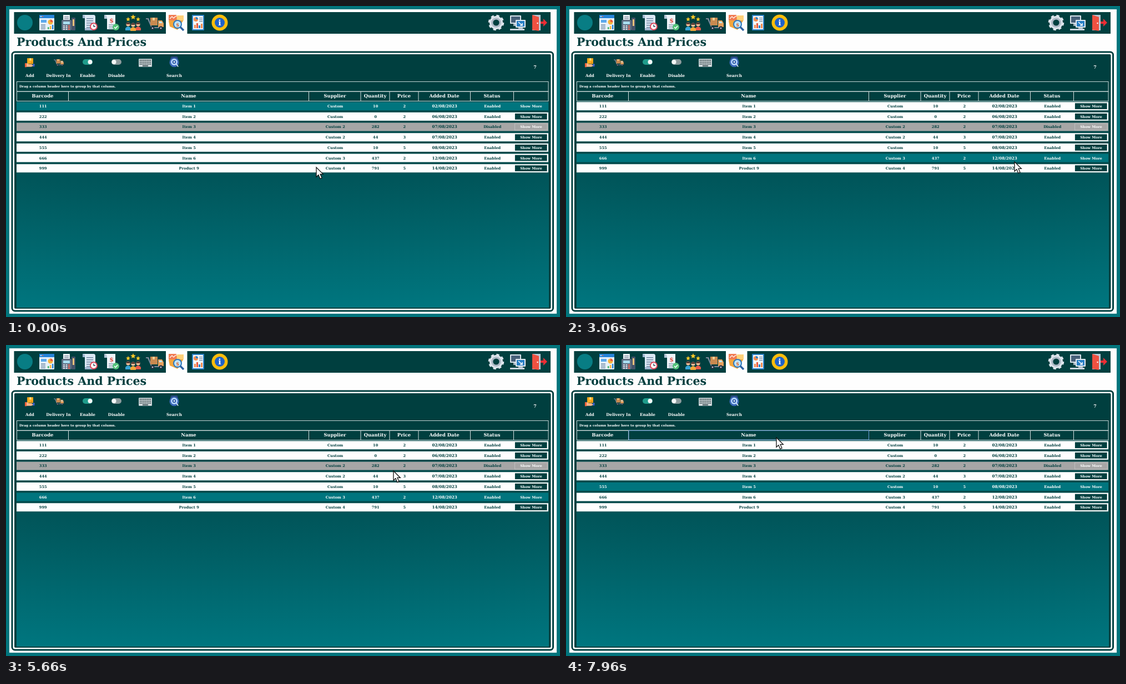
An HTML page that plays this animation: 998x561 px, repeating every 8000 ms.

```html
<!DOCTYPE html>
<html lang="en">
<head>
<meta charset="utf-8">
<title>Products And Prices</title>
<style>
html, body { margin: 0; width: 100%; height: 100%; overflow: hidden; background: #00757d }
svg { display: block; width: 100%; height: 100% }
text { font: bold 7px "DejaVu Serif", serif; text-rendering: geometricPrecision }
</style>
</head>
<body>
<svg id="stage" viewBox="0 0 998 561"></svg>
<script>
const DARK = '#003f3f', TEAL = '#00757e', WHITE = '#fefefe', GREY = '#a6a6a6';

// Drawing helpers, each returns SVG markup
const R = (x, y, w, h, fill, more = '') =>
  `<rect x="${x}" y="${y}" width="${w}" height="${h}" fill="${fill}" ${more}/>`;
const C = (x, y, r, fill, more = '') => `<circle cx="${x}" cy="${y}" r="${r}" fill="${fill}" ${more}/>`;
const P = (d, fill, more = '') => `<path d="${d}" fill="${fill}" ${more}/>`;
const L = (d, stroke, width = 1) => P(d, 'none', `stroke="${stroke}" stroke-width="${width}"`);
const T = (x, y, size, fill, text, anchor = 'middle', font = '') =>
  `<text x="${x}" y="${y}" fill="${fill}" text-anchor="${anchor}" style="font-size:${size}px;${font}">${text}</text>`;
const G = (x, y, scale, body) => `<g transform="translate(${x} ${y}) scale(${scale})">${body}</g>`;

// Icons, drawn around 0,0 in a box of about 28 px
const star = (x, y, r) => {
  let d = '';
  for (let i = 0; i < 10; i++) {
    const a = i * Math.PI / 5, q = i % 2 ? r * .45 : r;
    d += `${i ? 'L' : 'M'}${x + q * Math.sin(a)} ${y - q * Math.cos(a)}`;
  }
  return P(d + 'Z', '#ffc928');
};
const person = (x, y, shirt) =>
  P(`M${x - 5} ${y + 11}V${y + 7}Q${x} ${y + 1} ${x + 5} ${y + 7}V${y + 11}Z`, shirt) +
  C(x, y, 3.6, '#f5c09a') + P(`M${x - 3.6} ${y}A3.6 3.6 0 0 1 ${x + 3.6} ${y}Z`, '#5b3b33');
const lines = (x, y, w, n, gap, color) =>
  Array.from({ length: n }, (_, i) => R(x, y + i * gap, w, 1.4, color)).join('');

const icon = {
  logo: C(0, 0, 14, '#087d84'),
  dashboard: R(-13, -14, 27, 28, '#e6f1fb', 'rx="1"') + R(-13, -14, 27, 6, '#2684d8') +
    C(-10, -11, 1, '#fff') + C(-7, -11, 1, '#ff7058') + R(-10, -5, 10, 5, '#5ba9ec') +
    lines(-10, 3, 8, 4, 2.6, '#7d95ad') + C(7, -1, 4.5, '#f7b43c') + P('M7-1V-5.5A4.5 4.5 0 0 1 11.5-1Z', '#e9573f') +
    R(2, 8, 2.5, 4, '#4aba70') + R(6, 6, 2.5, 6, '#f7b43c') + R(10, 4, 2.5, 8, '#2684d8'),
  register: R(-9, -14, 12, 12, '#e8eef4') + lines(-7, -11, 8, 2, 3, '#8796a6') +
    R(-12, -5, 18, 19, '#5d6c80', 'rx="2"') + R(-9, -2, 12, 5, '#a9dcee') +
    [0, 1, 2, 3, 4, 5, 6, 7, 8].map(i => R(-9 + i % 3 * 4.5, 5 + (i / 3 | 0) * 3, 3, 2, i % 3 > 1 ? '#f06a5a' : '#dbe3ec')).join('') +
    R(6, -9, 7, 23, '#44536a', 'rx="1"') + R(8, -6, 3, 12, '#f1c27b'),
  history: P('M-13-14H7Q10-14 10-10V13H-9V-8H-13Z', '#dbe8f5') + P('M-13-14Q-8-14-9-8H-13Z', '#9fb6d0') +
    lines(-6, -8, 12, 5, 4, '#68829e') + P('M-9 10H6V14H-9Z', '#9fb6d0') +
    C(7, 7, 7, '#e2495b') + C(7, 7, 5, '#fff') + L('M7 3.5V7H10', '#3b4a63', 1.4),
  invoice: P('M-13-14H7V12H-8V-7H-13Z', '#edf3f8') + P('M-13-14Q-8-14-8-7H-13Z', '#b2c4d5') +
    T(0, 0, 11, '#e44f43', '$') + lines(-5, 3, 9, 3, 3, '#8ba0b5') +
    C(8, 8, 6, '#54c37a') + L('M5 8L7.3 10.3L11 6', '#fff', 1.7),
  people: star(0, -10, 5) + star(-9, -6, 4.2) + star(9, -6, 4.2) +
    person(-9, 3, '#38a7d8') + person(9, 3, '#e95c4b') + person(0, 4, '#f0a83a'),
  truck: P('M-16-8H-11L-5 8H12V10H-6L-13-6H-16Z', '#7c899b') + R(-8, -9, 13, 14, '#c98a50') +
    R(-4, -9, 4, 5, '#f0cd92') + P('M6-4H13L16 1V8H6Z', '#e8a05c') + P('M8-2H12L14 1H8Z', '#bfe5f0') +
    C(-4, 10, 3.4, '#27303f') + C(-4, 10, 1.3, '#cad3dd') + C(11, 10, 3.4, '#27303f') + C(11, 10, 1.3, '#cad3dd'),
  price: P('M-14-3L-3-12L13-5L2 13L-12 7Z', '#f4a63b') + P('M-14-14H0V-4H-14Z', '#f17b52') +
    L('M-12-7L-8-11L-5-8L-1-12', '#fff', 1.2) + R(1, -13, 12, 9, '#ffd17a') +
    C(2, 3, 8, '#2d78bd') + C(2, 3, 6, '#bfe6fa') + L('M7 8L13 14', '#2d62a2', 3.4) + T(2, 6.5, 9, '#e56b2f', '$'),
  report: R(-11, -14, 22, 28, '#2e83c8', 'rx="1"') + R(-9, -12, 18, 24, '#f3f7fb') +
    C(-4, -6, 4, '#f28b50') + P('M-4-6V-10A4 4 0 0 1 0-6Z', '#2e83c8') + lines(2, -9, 6, 3, 3, '#7890aa') +
    R(-7, 4, 3, 6, '#f28b50') + R(-3, 1, 3, 9, '#e9573f') + R(1, 5, 3, 5, '#2e83c8') + R(5, 2, 3, 8, '#f28b50'),
  info: C(0, 0, 14.5, '#fbbd0b') + C(0, 0, 9, '#1f62c9') + T(0, 5, 14, '#fff', 'i'),
  gear: C(0, 0, 12, '#dde4ec', 'stroke="#dde4ec" stroke-width="4.5" stroke-dasharray="5 4.42"') +
    C(0, 0, 9, '#aeb9c6') + C(0, 0, 5.6, DARK),
  computer: R(-14, -13, 20, 15, '#d9e2ea', 'rx="1"') + R(-12, -11, 16, 11, '#476079') + R(-8, 2, 8, 4, '#aebac7') +
    R(-4, -5, 18, 14, '#e3eaf0', 'rx="1"') + R(-2, -3, 14, 10, '#277fc5') + L('M1-1L8 5M8 1V5H4', '#fff', 1.5) +
    R(1, 9, 8, 4, '#aebac7') + R(-14, 11, 26, 3, '#cbd5de'),
  exit: R(-12, -14, 15, 28, '#b9c4d0') + P('M-12-14L0-10V15L-12 13Z', '#ef5141') + C(-2.5, 1, 1.2, '#fff') +
    P('M3-2H8V-7L15 0L8 7V2H3Z', '#ee2e35'),
  box: R(-8, -13, 18, 17, '#ffac1c') + R(-1, -13, 5, 7, '#ffe08a') + R(4, -2, 4, 3, '#d57a10') +
    P('M-14 3Q-8 0-3 5H5Q8 5 6 8L13 5Q16 5 13 9L4 13H-14Z', '#f7b58a') + R(-15, 2, 5, 12, '#f0643c') + R(9, 4, 5, 8, '#2e5ad2'),
  keyboard: R(-14, -8, 28, 17, '#d5dcdf', 'rx="1"') +
    Array.from({ length: 24 }, (_, i) => R(-12 + i % 8 * 3.1, -6 + (i / 8 | 0) * 4, 2, 2.4, '#33474b')).join('') +
    R(-6, 6, 12, 2, '#33474b'),
  search: R(-10, -15, 20, 24, '#27477c', 'rx="4"') + C(0, 1, 13, '#3a68b8') + C(0, 0, 9, '#b9d9ff') +
    C(0, 0, 5, '#2455a4') + C(0, 0, 2.2, '#fff') + L('M5 5L11 13', '#dfe9f5', 2.4)
};
const toggle = (x, color, knob) => R(x - 9, 96, 18, 10, color, 'rx="5"') + C(x + knob, 101, 4, '#f5f7f7');

// Static window
const bar = 'logo dashboard register history invoice people truck price report info'.split(' ');
const columns = [['Barcode', 66], ['Name', 329], ['Supplier', 592.5], ['Quantity', 665], ['Price', 717],
  ['Added Date', 789.5], ['Status', 875.5]];
const base =
  `<linearGradient id="fade" x2="0" y2="1"><stop stop-color="#014244"/><stop offset="1" stop-color="#00767f"/></linearGradient>` +
  R(0, 0, 998, 561, '#00757d') + R(6, 6, 986, 549, WHITE) + R(14.5, 11, 966.5, 39, DARK) + R(288, 11, 38.5, 39, WHITE) +
  bar.map((n, i) => G(34 + i * 39, 30, 1, icon[n])).join('') +
  G(883, 30, 1, icon.gear) + G(922, 30, 1, icon.computer) + G(960, 30, 1, icon.exit) +
  T(19, 72, 20.6, DARK, 'Products And Prices', 'start') +
  R(11, 83, 974.5, 467, WHITE, `rx="5" stroke="${DARK}" stroke-width="3"`) + R(15, 87, 966.5, 459, DARK, 'rx="2"') +
  G(43, 102, .6, icon.box) + G(95, 101, .55, icon.truck) + toggle(147, '#1f9c8b', 4.5) + toggle(199, '#8d9b9d', -4.5) +
  G(251, 102, .85, icon.keyboard) + G(303, 101, .66, icon.search) +
  [['Add', 43], ['Delivery In', 94.5], ['Enable', 147], ['Disable', 199], ['Search', 303]]
    .map(([s, x]) => T(x, 128, 7.25, '#fff', s)).join('') +
  T(953, 113, 8, '#fff', '7') +
  R(19.5, 136.5, 957.5, 17.5, DARK, 'stroke="#c5d3d3"') +
  T(24, 147, 5.87, '#fff', 'Drag a column header here to group by that column.', 'start', 'font-family:"Liberation Sans",sans-serif;font-weight:400') +
  R(19.5, 154.5, 957.5, 17, DARK, 'stroke="#c5d3d3"') +
  L([112.5, 545.5, 639, 691, 743, 836.5, 914.5].map(x => `M${x} 154V171`).join(''), '#d5dfdf') +
  columns.map(([s, x]) => T(x, 165.3, 8.4, '#fff', s)).join('') +
  R(19, 172, 959, 372, 'url(#fade)');

// Table rows
const data = [
  '111,Item 1,Custom,10,2,02/08/2023,Enabled', '222,Item 2,Custom,0,2,06/08/2023,Enabled',
  '333,Item 3,Custom 2,282,2,07/08/2023,Disabled', '444,Item 4,Custom 2,44,3,07/08/2023,Enabled',
  '555,Item 5,Custom,10,5,08/08/2023,Enabled', '666,Item 6,Custom 3,437,2,12/08/2023,Enabled',
  '999,Product 9,Custom 4,791,5,14/08/2023,Enabled'].map(s => s.split(','));

function rows(selected, hover) {
  return R(19, 172, 959, 129, '#034a4b') + data.map((row, i) => {
    const y = 173.2 + 18.68 * i, on = i === selected, off = row[6] === 'Disabled';
    const fill = on ? TEAL : off ? GREY : WHITE, lit = on && hover;
    const button = lit ? WHITE : on ? TEAL : off ? GREY : DARK;
    return R(19, y, 958, 15, fill) +
      row.map((s, k) => T(columns[k][1] + .7, y + 9.9, k === 5 ? 7.2 : 6.6, on ? '#fff' : DARK, s)).join('') +
      R(916.5, y + 1.7, 58.5, 11.6, button, on ? '' : `stroke="${off ? '#c4c4c4' : '#fff'}" stroke-width=".8"`) +
      T(946, y + 9.9, 6.3, lit ? DARK : '#fff', 'Show More');
  }).join('');
}

// Edit dialog
const labels = ['Product Name :', 'Barcode :', 'Supplier :', 'Sell Price ( $ ) :', '2nd Sell Price ( $ ) :', 'Cost ( $ ) :',
  'Has Discount :', 'Include TVA :', 'Has Quantity :', 'Has Expired Date :'];
const fieldY = i => 128.5 + 27.45 * i;
const hole = (x, y, w, h) => `M${x} ${y}h${w}v${h}h${-w}Z`;
const box = (i, fill) => R(499.3, fieldY(i), 197, 19.5, fill, 'rx="2.5" stroke="#3f7375" stroke-width=".8"');

function nameField(name, caret) {
  return box(0, WHITE) + R(573, 129, 49, 17, '#0b78d7') + T(597.5, 142.9, 13.3, '#fff', name) +
    (caret ? R(621, 129, 1, 17, '#000') : '');
}

function skeleton(name) {
  let d = 'M297 124H701V463H297Z' + hole(301, 128, 197, 248) + hole(303, 377.5, 194, 25) +
    hole(499, 376, 197.5, 28) + hole(301, 430, 395.5, 29) + hole(499, 183, 197.5, 19.5);
  let edges = '';
  for (const i of [1, 3, 4, 5, 6, 7, 8]) {
    d += hole(502, fieldY(i) + 1, 191, 17.5);
    edges += box(i, 'none');
  }
  return P(d, WHITE, 'fill-rule="evenodd"') + edges + L('M293 71H704M295 69V467M702.5 69V467M293 465H704', TEAL, 4) + nameField(name);
}

function mark(x, y, yes) {
  return C(x, y, 8, '#e31d25') +
    L(yes ? `M${x - 4} ${y}l3 3l5.5-6` : `M${x - 3.5} ${y - 3.5}l7 7m0-7l-7 7`, '#fff', 2);
}

function dialog(values, caret) {
  return R(293, 69, 411.5, 398, TEAL) + R(297, 124, 404, 339, WHITE) + G(317, 96, 1.08, icon.box) +
    T(342, 105.5, 27, '#fff', 'Edit Product', 'start') + R(661, 80, 15, 14, DARK) + G(668.5, 87, .46, icon.keyboard) +
    R(681.5, 80, 14.5, 15, DARK) + T(688.7, 91, 10.5, '#fff', 'X') +
    labels.map((s, i) => {
      const y = 141.5 + 27.53 * i, x = i === 9 ? 307 : 305;
      return P(`M${x} ${y - 5}L${x + 11} ${y + .5}L${x} ${y + 6}L${x + 2} ${y + .5}Z`, '#5b8a8a') +
        L(`M${x + 1} ${y - 2}l6 2.5l-6 2.5M${x} ${y - 5}l11 5.5l-11 5.5`, DARK, .9) +
        T(x + 16, y + 4.5, i < 6 ? 12.6 : 11.7, DARK, s, 'start');
    }).join('') +
    nameField(values[0], caret) +
    values.map((s, i) => {
      if (!i) return '';
      if (i === 2) return R(499, 183, 197, 18.5, WHITE, 'stroke="#a9b4b4" stroke-width=".8"') +
        T(500, 196, 11.65, DARK, s, 'start') + L('M689.5 191.5l2 2l2-2', '#8a9595');
      return box(i, WHITE) + T(597.5, fieldY(i) + 14.3, i === 7 ? 13 : 13.4, i === 7 ? '#6b6b6b' : DARK, s);
    }).join('') +
    mark(489, 307, true) + mark(489, 334, true) + mark(489, 361.5) + mark(488, 389.5) +
    R(498.5, 376, 198, 28, DARK) + T(597, 393.5, 10.3, '#001d1d', 'Edit Expired Date') +
    R(301, 429.5, 395.5, 29.5, DARK) + T(497.5, 450.3, 17, '#fff', 'SAVE');
}

const tax = '11% TVA * Sell Price';
const edits = [
  { open: 4060, close: 5300, values: ['Item 6', '666', 'Custom 3', '2', '1.5', '1', '20', tax, '437'] },
  { open: 6760, close: 7660, values: ['Item 5', '555', 'Custom', '5', '4.5', '4', '0', tax, '10'] }
];

// Pointer stops: time, x, y
const path = [[0, 559, 291], [600, 559, 291], [860, 538, 237], [1030, 538, 237], [1060, 537, 236], [1300, 537, 236],
  [1600, 541, 218], [1760, 541, 218], [2030, 549, 233], [2330, 566, 252], [2560, 600, 258], [2600, 600, 258],
  [3040, 808, 281], [3070, 808, 281], [3220, 870, 285], [3400, 930, 277], [3430, 930, 277], [3600, 944, 274],
  [4060, 944, 274], [4300, 638, 220], [4860, 682, 88], [4960, 682, 87], [5300, 682, 87], [5660, 698, 227],
  [6100, 684, 257], [7030, 684, 257], [7500, 687, 88], [7660, 687, 88], [7830, 685, 95], [7860, 685, 95],
  [7960, 379, 167], [8000, 379, 167]];
const picks = [[0, 0], [1300, 3], [1760, 2], [1960, 3], [2330, 4], [3030, 5], [6160, 4]];

function pointer(t) {
  const k = path.findIndex(p => p[0] > t), [t0, x0, y0] = path[k - 1], [t1, x1, y1] = path[k];
  const u = (t - t0) / (t1 - t0);
  return [x0 + (x1 - x0) * u, y0 + (y1 - y0) * u];
}

const stage = document.getElementById('stage');
stage.innerHTML = base + '<g id="live"></g><g id="arrow">' +
  P('M0 0V17.2L3.9 13.6L6.8 20.5L10 19.1L7.1 12.4H12.3Z', '#fff', 'stroke="#111" stroke-width="1.3"') + '</g>';
const live = document.getElementById('live'), arrow = document.getElementById('arrow');
let shown = '';

function frame() {
  const t = performance.now() % 8000;
  const selected = picks.filter(p => p[0] <= t).pop()[1];
  const hover = t >= 3430 && t < 5300, header = t >= 7940;
  const edit = edits.find(e => t >= e.open && t < e.close);
  const ready = edit && t >= edit.open + 70, caret = t >= 5100 && t < 5300;
  const key = [selected, hover, header, edit && edit.open, ready, caret].join();
  if (key !== shown) {
    shown = key;
    live.innerHTML = rows(selected, hover) +
      (header ? R(113, 154.5, 432.5, 16.5, 'none', 'stroke="#6d9fd8"') : '') +
      (!edit ? '' : ready ? dialog(edit.values, caret) : skeleton(edit.values[0]));
  }
  arrow.setAttribute('transform', `translate(${pointer(t).join(' ')})`);
  requestAnimationFrame(frame);
}
frame();
</script>
</body>
</html>
```
